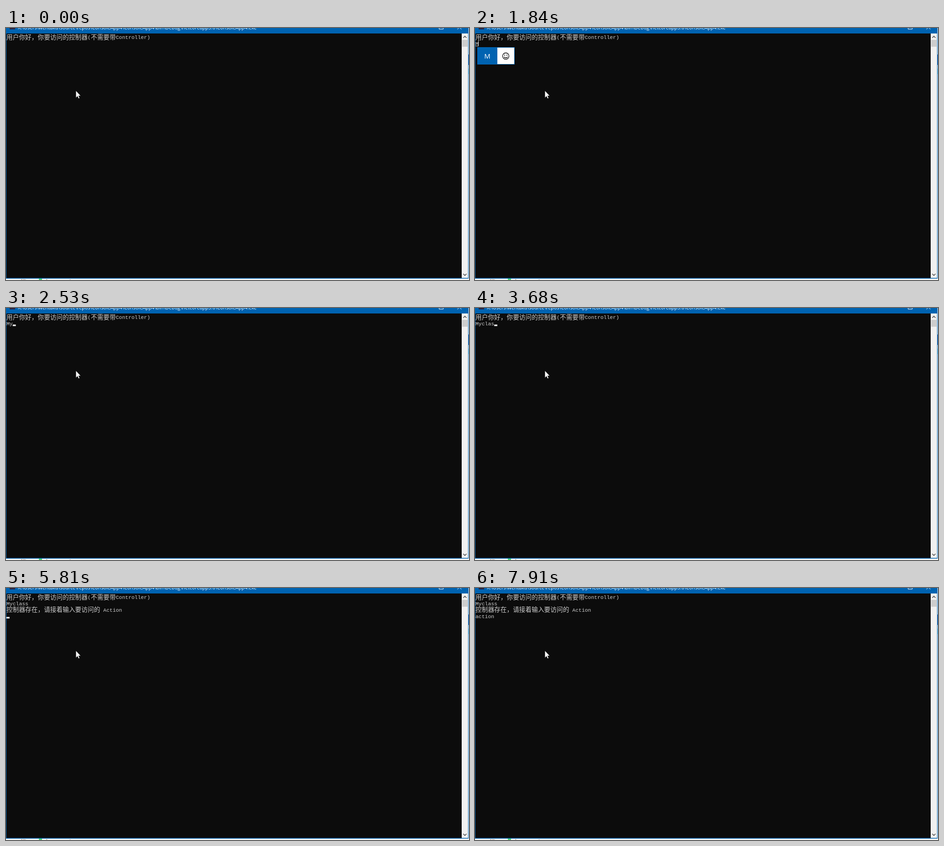
Animation of 1015x552 px, one loop 8 s. Source, as an HTML page:

```html
<!DOCTYPE html>
<html lang="zh-CN">
<head>
<meta charset="utf-8">
<title>Console</title>
<style>
  html, body { margin: 0; height: 100%; overflow: hidden; background: #0c0c0c; }
  svg { display: block; width: 100vw; height: 100vh; }
  text { white-space: pre; }
  .ui { font-family: "Open Sans", "Noto Sans", sans-serif; }
  .latin { font: 11.42px "Liberation Mono", monospace; fill: #ccc; }
  .cjk { font: 300 13.7px "Noto Sans CJK SC", "Noto Sans CJK", sans-serif; fill: #ccc; }
  .chevron { fill: none; stroke: #505050; stroke-width: 1.7; }
</style>
</head>
<body>
<svg viewBox="0 0 1015 552">
  <!-- page behind the window -->
  <rect width="1015" height="552" fill="#f4f4f4"/>
  <rect x="1014" y="58" width="1" height="23" fill="#2b579a"/>
  <rect x="1014" y="89" width="1" height="12" fill="#9fdde6"/>
  <text class="ui" x="20" y="558" font-size="11" fill="#555">a dilt</text>
  <rect x="72" y="549" width="7" height="3" fill="#4fd675"/>
  <text class="ui" x="88" y="558" font-size="11" fill="#555">been on at</text>

  <!-- window -->
  <rect width="1014" height="549" fill="#0063b1"/>
  <rect x="1" y="12" width="998" height="535.5" fill="#0c0c0c"/>
  <rect x="8" y="-9" width="12" height="12" fill="#2b2340"/>
  <text class="ui" x="26" y="3" font-size="10.78" fill="#fff">X:\Users\wentaku\source\repos\ConsoleApp4\ConsoleApp4\bin\Debug\netcoreapp3.0\ConsoleApp4.exe</text>
  <path d="M949.5-6.5h9v9h-9zM989.5-6l9 9m0-9l-9 9" fill="none" stroke="#fff"/>

  <!-- scrollbar -->
  <rect x="999" y="12" width="14" height="535.5" fill="#f0f0f0"/>
  <rect x="1000" y="26" width="12" height="15" fill="#cdcdcd"/>
  <path class="chevron" d="M1002.5 21.5l3.5-3.5 3.5 3.5M1002.5 538.5l3.5 3.5 3.5-3.5"/>

  <!-- console -->
  <text class="cjk" x="1" y="24.5">用户你好，你要访问的控制器</text>
  <text class="latin" x="179.1" y="24">(</text>
  <text class="cjk" x="185.95" y="24.5">不需要带</text>
  <text class="latin" x="240.75" y="24">Controller)</text>
  <text class="latin" x="1" y="38" id="row2"></text>
  <g id="reply">
    <text class="cjk" x="1" y="52">控制器存在，请接着输入要访问的</text>
    <text class="latin" x="213.35" y="51.5">Action</text>
    <text class="latin" x="1" y="65.5" id="row4"></text>
  </g>
  <rect id="block" width="6.85" height="3.3" fill="#f2f2f2"/>
  <path id="compose" fill="none" stroke="#ccc"/>

  <g id="popup" class="ui"></g>
  <path d="M153.3 137.5v15.2l3.5-3.3 2.3 5.1 2.2-1-2.2-5h4.6z" fill="#fff" stroke="#000" stroke-width=".4"/>
</svg>
<script>
const $ = id => document.getElementById(id);
const CELL = 6.85, LOOP = 8000, ENTER = 4560;

// "_" is the block cursor, "|" the input method caret
const steps = [
  [0, ""], [520, "_"], [1040, ""], [1590, "_"],
  [1740, "M|"], [1840, "M|", "M"], [2060, "My|", "My"],
  [2530, "My_"], [2600, "My"], [3150, "Myc"], [3300, "Mycl_"], [3450, "Mycla_"],
  [3680, "Myclas_"], [3780, "Myclass_"], [4230, "Myclass"],
  [ENTER, "_"], [5260, ""], [5810, "_"], [6360, ""],
  [6810, "a_"], [6890, "a"], [7140, "ac_"], [7360, "act"],
  [7510, "acti_"], [7660, "actio_"], [7910, "action"]
];

const words = [
  [20, 29, "My"], [79, 88.5, "Myself"], [162, 174, "$"], [213.5, 223, "Myers"],
  [293, 302.5, "Mystery"], [386, 395, "Mysteries"], [489.5, 499, "Mysterious"]
];

const label = (x, size, fill, s) =>
  `<text x="${x}" y="67" font-size="${size}" fill="${fill}">${s}</text>`;

function frame(right, split, divider, labels) {
  const cx = right - 19.5;
  return `<rect x="5.5" y="42.5" width="${right - 6}" height="37" fill="#fff" stroke="#0063b1"/>
    <rect x="5" y="42" width="${split - 5}" height="38" fill="#0063b1"/>
    <rect x="${divider}" y="42" width="1" height="38" fill="#0063b1"/>${labels}
    <g transform="translate(${cx} 61.5)">
      <path d="M-7 0a7 7 0 1 1 14 0a7 7 0 1 1-14 0M-4 1.7q4 4.6 8 0" fill="none" stroke="#000" stroke-width="1.3"/>
      <circle cx="-2.5" cy="-2" r="1.1"/><circle cx="2.5" cy="-2" r="1.1"/>
    </g>`;
}

const popups = {
  M: frame(87, 49, 48, label(20.3, 14.9, "#fff", "M")),
  My: frame(629, 65, 590, words.map(([nx, wx, word], i) =>
    label(nx, 10.5, i ? "#767676" : "#fff", i + 1) +
    label(wx, 14.9, i ? "#000" : "#fff", word)).join(""))
};

let shown;
function draw(now) {
  const t = now % LOOP;
  const step = steps.findLast(s => s[0] <= t);
  if (step !== shown) {
    shown = step;
    const [, line, popup] = step;
    const entered = t >= ENTER;
    const typed = line.replace(/[_|]/, "");
    const end = 1 + typed.length * CELL;
    $("row2").textContent = entered ? "Myclass" : typed;
    $("row4").textContent = entered ? typed : "";
    $("reply").style.display = entered ? "" : "none";
    $("block").style.display = line.endsWith("_") ? "" : "none";
    $("block").setAttribute("x", end);
    $("block").setAttribute("y", entered ? 63.4 : 36.3);
    $("compose").setAttribute("d", line.endsWith("|") ? `M1 39.5H${end}M${Math.floor(end) + .5} 26V40` : "");
    $("popup").innerHTML = popups[popup] || "";
  }
  requestAnimationFrame(draw);
}
draw(0);
</script>
</body>
</html>
```
